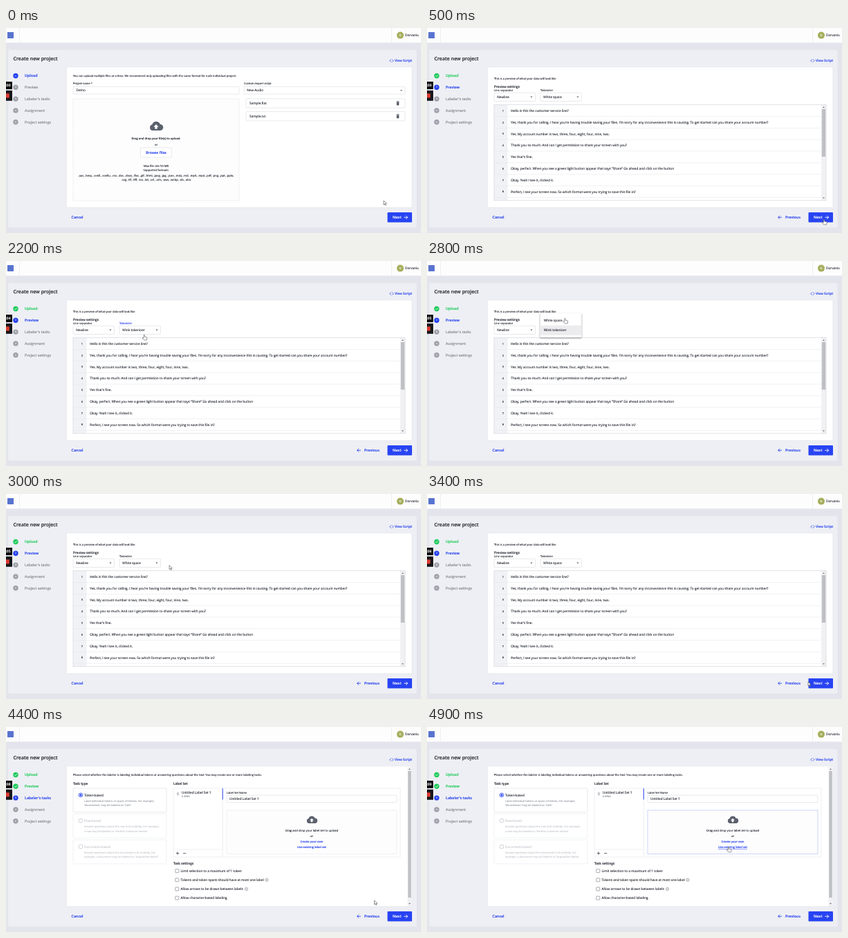
An HTML page for the animation above (5000 ms loop, 600 px wide and 298 px high).

```html
<!DOCTYPE html>
<html lang="en">
<head>
<meta charset="utf-8">
<title>Create new project</title>
<style>
html, body { margin: 0; width: 100%; height: 100%; overflow: hidden; background: #e3e4ec; }
svg { display: block; width: 600px; height: 298px; font-family: "Open Sans", "Noto Sans", sans-serif; text-rendering: geometricPrecision; }
text { white-space: pre; stroke-width: .13px; }
.menu { filter: drop-shadow(0 1px 1.2px rgba(0, 0, 0, .45)); }
</style>
</head>
<body>
<svg id="stage" viewBox="0 0 600 298"></svg>
<script>
const stage = document.getElementById('stage');
const INK = '#252932', BLUE = '#2743ee', GREEN = '#1fcb5c', GREY = '#7c808a', LINE = '#d8dae0', PALE = '#c6c8cf';
const LOOP = 5000, STEP = 100;

// Drawing helpers
const text = (x, y, s, { size = 4.73, fill = INK, bold, mid, extra = '' } = {}) =>
  `<text x="${x}" y="${y}" font-size="${size}" fill="${fill}" stroke="${fill}" ${bold ? 'font-weight="600"' : ''} ${mid ? 'text-anchor="middle"' : ''} ${extra}>${s}</text>`;
const small = (x, y, s, o) => text(x, y, s, { size: 4.08, ...o });
const rect = (x, y, w, h, fill, stroke = 'none', extra = '') =>
  `<rect x="${x}" y="${y}" width="${w}" height="${h}" fill="${fill}" stroke="${stroke}" stroke-width=".6" ${extra}/>`;
const path = (d, stroke, width = .6, fill = 'none') =>
  `<path d="${d}" fill="${fill}" stroke="${stroke}" stroke-width="${width}"/>`;
const circle = (x, y, r, fill, stroke = 'none') =>
  `<circle cx="${x}" cy="${y}" r="${r}" fill="${fill}" stroke="${stroke}" stroke-width=".8"/>`;
const box = (x, y, w, h) => rect(x, y, w, h, '#fff', LINE, 'rx="1"');
const dashed = (x, y, w, h, color) => rect(x, y, w, h, '#fdfdfe', color, 'stroke-dasharray="1.6 1"');
const caret = (x, y) => path(`M${x - 1.6} ${y - .8}h3.2l-1.6 1.7z`, 'none', 0, '#555a64');
const select = (x, y, w, h, s) => box(x, y, w, h) + text(x + 4.3, y + h / 2 + 1.7, s) + caret(x + w - 5.5, y + h / 2);
const cloud = (x, y, k) => `<g transform="translate(${x} ${y}) scale(${k})">` +
  path('M-5 6.5a4.5 4.5 0 0 1-.6-8.8a6 6 0 0 1 11.3-.6a4.7 4.7 0 0 1-.2 9.4z', 'none', 0, '#5b616d') +
  path('M0-2.6l3.6 3.8h-2v3h-3.2v-3h-2z', 'none', 0, '#fff') + '</g>';
const arrow = (x, y, dir, color) => path(`M${x - 2.6} ${y}h5.2M${x + dir * .3} ${y - 2.4}l${dir * 2.4} 2.4l${-dir * 2.4} 2.4`, color, .9);
const group = html => {
  const g = document.createElementNS('http://www.w3.org/2000/svg', 'g');
  g.innerHTML = html;
  stage.append(g);
  return g;
};
const show = (g, on) => g.style.display = on ? '' : 'none';

// Frame shared by all pages
group(
  rect(0, 0, 600, 298, '#e3e4ec') + rect(0, 0, 600, 21.3, '#fdfdfe') +
  path('M19.5 0V21M557.5 0V21', '#e4e5eb') + rect(2, 6, 9, 9, '#5873cf') +
  circle(570, 10.6, 5, '#a5ae5c') + small(570, 12.1, 'D', { mid: 1, fill: '#fff' }) + text(577, 12.4, 'Dorvanix') +
  rect(2.7, 31.7, 591.3, 258.6, '#eeeff4', '#e3e4ea', 'rx="2"') +
  text(10.5, 47, 'Create new project', { size: 7.05, bold: 1 }) +
  path('M556.8 45.5l-2 2l2 2M558.2 45.5l2 2l-2 2', BLUE, .8) + text(562, 49.4, 'View Script', { bold: 1, fill: BLUE }) +
  rect(87.3, 56.7, 499.7, 204.3, '#fff', '#dfe0e6', 'rx="1.5"') +
  text(94.5, 277, 'Cancel', { size: 5.35, bold: 1, fill: BLUE }) +
  rect(551.5, 268, 35.5, 14.6, '#2844f2', 'none', 'rx="1"') +
  text(559, 277.2, 'Next', { size: 5.5, bold: 1, fill: '#fff' }) + arrow(578, 275.3, 1, '#fff')
);
const previous = group(arrow(510.3, 275.2, -1, BLUE) + text(518, 277, 'Previous', { size: 5.35, bold: 1, fill: BLUE }));

// Sidebar, one per page
const steps = ['Upload', 'Preview', 'Labeler\'s tasks', 'Assignment', 'Project settings'];
const sidebars = [0, 1, 2].map(now => group(steps.map((name, i) => {
  const y = 69.5 + i * 16.8, done = i < now, color = done ? GREEN : i == now ? BLUE : GREY;
  return circle(14, y, 3.7, i > now ? '#9ea1aa' : color) +
    (done ? path(`M12.2 ${y}l1.3 1.3l2.4-2.6`, '#fff', .8)
          : text(14, y + 1.1, i + 1, { size: 3.2, mid: 1, fill: '#fff' })) +
    text(27, y + 1.9, name, { size: 5.35, bold: i <= now, fill: color });
}).join('')));

// Page 1: upload
const fileRow = (y, name) => box(347, y, 230, 13.3) + text(352, y + 8.4, name) +
  path(`M564.3 ${y + 4.4}h4.4M565.6 ${y + 3.7}h1.8`, '#555a64', .8) + rect(564.8, y + 5.2, 3.4, 4.4, '#555a64');
const upload =
  small(97, 70.6, 'You can upload multiple files at a time. We recommend only uploading files with the same format for each individual project.') +
  small(97, 82.4, 'Project name *', { size: 4 }) + box(97, 85.3, 240, 10.8) + text(101.5, 92.4, 'Demo') +
  small(344, 82.4, 'Custom import script', { size: 4 }) + select(344, 85.3, 233, 10.8, 'New Audio') +
  fileRow(102.8, 'Sample.flac') + fileRow(121.6, 'Sample.txt') +
  dashed(97, 102.8, 240, 148.2, LINE) + cloud(217, 142.6, 1) +
  small(217, 162, 'Drag and drop your file(s) to upload.', { mid: 1, bold: 1 }) +
  small(217, 170.6, 'or', { mid: 1 }) + box(194.5, 174, 45, 14) +
  text(217, 183, 'Browse files', { size: 5.15, mid: 1, bold: 1, fill: BLUE }) +
  small(217, 202, 'Max file size 50 MB', { mid: 1 }) + small(217, 207.9, 'Supported formats:', { mid: 1 }) +
  small(217, 216.3, '.aac, .bmp, .conll, .conllu, .csv, .doc, .docx, .flac, .gif, .html, .jpeg, .jpg, .json, .m4a, .md, .mp3, .mp4, .pdf, .png, .ppt, .pptx,', { mid: 1 }) +
  small(217, 222, '.svg, .tif, .tiff, .tsv, .txt, .url, .urls, .wav, .webp, .xls, .xlsx', { mid: 1 });

// Page 2: preview
const lines = [
  'Hello is this the customer service line?',
  'Yes, thank you for calling. I hear you\'re having trouble saving your files. I\'m sorry for any inconvenience this is causing. To get started can you share your account number?',
  'Yes. My account number is two, three, four, eight, four, nine, two.',
  'Thank you so much. And can I get permission to share your screen with you?',
  'Yes that\'s fine.',
  'Okay, perfect. When you see a green light button appear that says “Share” Go ahead and click on the button',
  'Okay. Yeah I see it, clicked it.',
  'Perfect, I see your screen now. So which format were you trying to save this file in?'
];
const scrollbar = (x, y, w, h, thumbY, thumbH) => rect(x, y, w, h, '#f1f1f3') +
  rect(x + .8, thumbY, w - 1.6, thumbH, '#bfc0c4') +
  path(`M${x + w / 2 - 1.4} ${y + 4.5}h2.8l-1.4-1.7zM${x + w / 2 - 1.4} ${y + h - 4.5}h2.8l-1.4 1.7z`, 'none', 0, '#666');
const preview =
  small(97, 75.1, 'This is a preview of what your data will look like') +
  text(97, 86.8, 'Preview settings', { bold: 1 }) + small(97, 92, 'Line separator') +
  select(97, 94.2, 59.5, 12.3, 'Newline') +
  rect(97, 111.5, 480, 139.3, '#fff') + rect(97, 111.5, 19.5, 139.3, '#f1f2f5') +
  lines.map((s, i) => {
    const y = 120.2 + i * 16.81;
    return small(110, y + 1.5, i + 1, { mid: 1 }) + text(121.3, y + 1.7, s) + path(`M97 ${y + 8.4}H570`, '#e1e2e7', .5);
  }).join('') +
  scrollbar(570, 111.5, 7, 139.3, 118, 69) + rect(97, 111.5, 480, 139.3, 'none', '#cfd1d8');

// Page 3: labeler's tasks
const option = (y, name, a, b, on) => rect(97, y, 135, 34.8, '#fff', on ? LINE : '#e6e7eb', 'rx="1"') +
  circle(108, y + 9.9, 2.9, '#fff', on ? BLUE : PALE) + (on ? circle(108, y + 9.9, 1.6, BLUE) : '') +
  text(113, y + 11.6, name, { fill: on ? INK : PALE }) +
  small(113, y + 20, a, { size: 3.9, fill: on ? '#9da0a9' : PALE }) +
  small(113, y + 26.4, b, { size: 3.9, fill: on ? '#9da0a9' : PALE });
const check = (y, s, info) => rect(244.8, y - 2.5, 5, 5, '#fff', '#6c717b', 'rx=".6"') + text(252.6, y + 1.7, s) +
  (info ? circle(info, y, 2, '#fff', '#8a8e97') + path(`M${info} ${y - 1.1}v.5M${info} ${y - .2}v1.4`, '#777', .5) : '');
const tasks =
  small(97, 70.6, 'Please select whether the labeler is labeling individual tokens or answering questions about the text. You may create one or more labeling tasks.') +
  text(97, 84.3, 'Task type', { bold: 1 }) +
  option(89, 'Token-based', 'Label individual tokens or spans of tokens. For example,', '\'Moonbrews\' may be labeled as \'Cafe\'', true) +
  option(126.3, 'Row-based', 'Answer questions about the row in its entirety. For example,', 'a row may be labeled as \'Positive customer review\'') +
  option(164, 'Document-based', 'Answer questions about the document in its entirety. For', 'example, a document may be labeled as \'Acquisition Robot\'') +
  text(242, 84.3, 'Label Set', { bold: 1 }) + rect(242, 89, 328, 100, '#fff', '#e3e4e9') +
  path('M313.5 89V189M242 178H313.5', '#e3e4e9') + path('M313.2 89.3V105.5', BLUE, 1) +
  path('M247.7 95v4.4M249.3 95v4.4', '#8a8e97', .7) +
  text(254, 96.6, 'Untitled Label Set 1') + text(254, 101.7, '0 ITEMS', { size: 3.2, fill: '#777b85' }) +
  path('M245.8 183.6h4.4M248 181.4v4.4M256 183.6h4.4', INK, .7) +
  small(319, 97, 'Label Set Name', { size: 4 }) + box(319, 99.2, 246, 10.4) + text(323, 106.2, 'Untitled Label Set 1') +
  text(242, 199.8, 'Task settings', { bold: 1 }) +
  check(209.2, 'Limit selection to a maximum of 1 token') +
  check(222.3, 'Tokens and token spans should have at most one label', 377) +
  check(235.5, 'Allow arrows to be drawn between labels', 347.5) +
  check(248.6, 'Allow character-based labeling') +
  scrollbar(580.5, 57.5, 6, 203, 64, 184);
const pages = [upload, preview, tasks].map(group);

// Parts that react to the pointer
const tokenizer = ['White space', 'Wink tokenizer'].map(s => group(select(164, 94.2, 59.5, 12.3, s)));
const labels = [INK, BLUE].map(fill => group(small(164, 92, 'Tokenizer', { fill })));
const menus = [90, 76].map((top, chosen) => group(
  rect(163.5, top, 60, 35.2, '#fff', 'none', 'class="menu" rx="1"') +
  rect(163.5, top + 3.4 + chosen * 14.2, 60, 14.2, '#ececef') +
  text(169, top + 12.2, 'White space') + text(169, top + 26.3, 'Wink tokenizer')));
const drops = [0, 1].map(hot => group(
  dashed(319, 121, 246, 63.5, hot ? '#7d8df0' : LINE) + cloud(442, 134.8, .8) +
  small(442, 152.3, 'Drag and drop your label set to upload', { size: 4.25, mid: 1 }) + small(442, 160.1, 'or', { mid: 1 }) +
  small(442, 168.4, 'Create your own', { size: 4.15, mid: 1, bold: 1, fill: BLUE })));
const links = ['', 'text-decoration="underline"'].map(extra => group(
  small(442, 176.3, 'Use existing label set', { size: 4.15, mid: 1, bold: 1, fill: BLUE, extra })));

// Recorder badge
group(rect(0, 78, 9, 11, '#0b0b0d') + rect(0, 90.8, 9, 15, '#17171a') + rect(0, 95.2, 4.8, 6.2, '#dc3a30', 'none', 'rx=".6"'));
const clock = group(text(-.6, 85.3, ':00', { size: 5, bold: 1, fill: '#fff' })).firstChild;

// Pointer shapes, tip at the origin
const arrowTip = group(path('M0 0v5.9l1.4-1.2l1 2.2l1-.5l-1-2.1h1.9z', '#333', .55, '#fff'));
const hand = group(path('M-.7.7q.8-1 1.4 0v2.4l2.6.5q1 .3.8 1.4l-.6 2.9h-3.7l-2.5-2.9q.2-1 1.1-.6l.9.7z', '#444', .55, '#fff'));

const route = [
  [0, 546, 251], [300, 574, 278], [600, 574, 278], [1200, 204, 102], [1300, 203, 102], [1600, 199.5, 110],
  [2000, 199.5, 114], [2400, 200, 100], [2800, 199.5, 83], [2900, 199.5, 84], [3400, 551, 273],
  [3700, 566, 279], [4200, 566, 279], [4800, 437, 175], [4900, 436, 174], [LOOP, 436, 174]
];
function pointer(t) {
  const i = route.findIndex(p => p[0] > t), [t0, x0, y0] = route[i - 1], [t1, x1, y1] = route[i];
  const k = (t - t0) / (t1 - t0), e = k * k * (3 - 2 * k);
  return [x0 + (x1 - x0) * e, y0 + (y1 - y0) * e];
}
const inside = ([x, y], l, t, r, b) => x >= l && x <= r && y >= t && y <= b;

function draw(t) {
  const page = t < 400 ? 0 : t < 3800 ? 1 : 2, p = pointer(t);
  const menu = t >= 1300 && t < 2000 ? 0 : t >= 2500 && t < 2900 ? 1 : -1;
  const wink = t >= 2000 && t < 2900, focus = t >= 1300 && t < 2900;
  const hot = page == 2 && inside(p, 319, 121, 565, 185), onLink = page == 2 && inside(p, 420, 172, 464, 179);
  const onSelect = page == 1 && inside(p, 164, menu == 1 ? 76 : 94, 224, menu == 0 ? 126 : 108);
  const pointing = onLink || onSelect || inside(p, 551.5, 268, 587, 283);

  pages.forEach((g, i) => show(g, i == page));
  sidebars.forEach((g, i) => show(g, i == page));
  show(previous, page > 0);
  tokenizer.forEach((g, i) => show(g, page == 1 && i == wink));
  labels.forEach((g, i) => show(g, page == 1 && i == focus));
  menus.forEach((g, i) => show(g, i == menu));
  drops.forEach((g, i) => show(g, page == 2 && i == hot));
  links.forEach((g, i) => show(g, page == 2 && i == onLink));
  clock.textContent = ':0' + Math.floor(t * .0019);
  [arrowTip, hand].forEach((g, i) => {
    show(g, i == pointing);
    g.setAttribute('transform', `translate(${p})`);
  });
}

const start = performance.now();
function tick() {
  const t = (performance.now() - start) % LOOP;
  draw(Math.floor(t / STEP) * STEP);
  requestAnimationFrame(tick);
}
tick();
</script>
</body>
</html>
```
